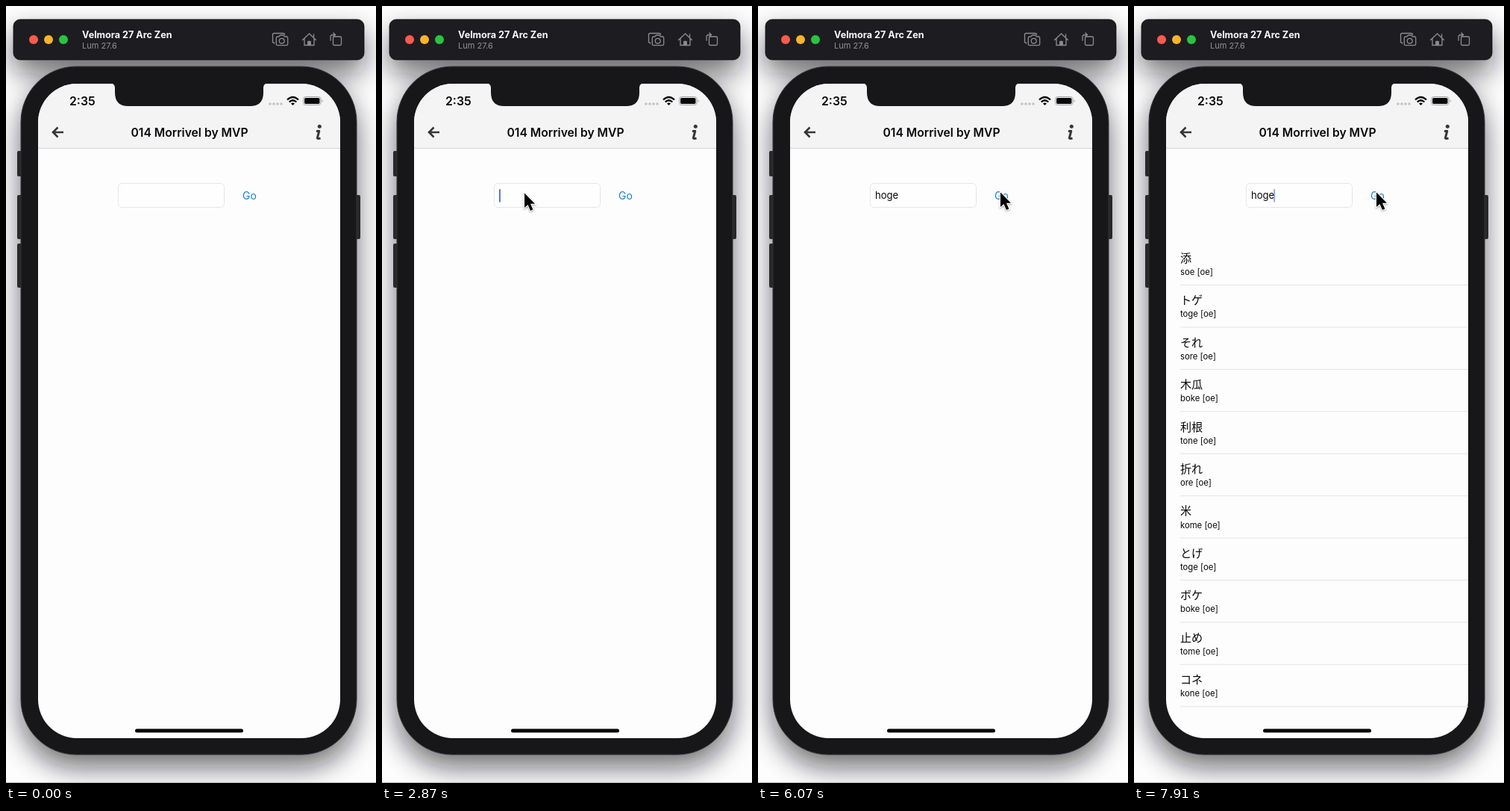
An HTML page that plays this animation: 496 by 1040 pixels, repeating every 8000 ms.

```html
<!DOCTYPE html>
<html lang="en">
<head>
<meta charset="utf-8">
<title>Word search</title>
<style>
html, body { margin: 0; width: 100%; height: 100%; overflow: hidden; background: #fdfdfd; }
svg { display: block; width: 496px; height: 1040px; }
text { font-family: Inter, "Noto Sans CJK JP", "Noto Sans CJK", sans-serif; fill: #08080a; }
.icon { fill: none; stroke: #8d8d90; stroke-width: 1.3; stroke-linejoin: round; stroke-linecap: round; }
</style>
</head>
<body>
<svg viewBox="0 0 496 1040">
  <defs>
    <filter id="shadow" x="-30%" y="-30%" width="160%" height="160%"><feGaussianBlur stdDeviation="18"/></filter>
    <filter id="soft" x="-50%" y="-50%" width="200%" height="200%"><feGaussianBlur stdDeviation="1.3"/></filter>
    <clipPath id="screenClip"><rect id="screen" x="43" y="104" width="405" height="876" rx="52"/></clipPath>
    <rect id="body" x="20" y="81" width="450" height="921" rx="74"/>
    <rect id="bar" x="10" y="18" width="470" height="54" rx="9"/>
    <path id="arrow" d="M0 0V19.5L4.500 15.400 8 23.500 11.400 22 8 14.300H14Z"/>
  </defs>

  <rect width="496" height="1040" fill="#fdfdfd"/>
  <g fill="#0c0c18" opacity=".6" filter="url(#shadow)">
    <use href="#body" y="17"/><use href="#bar" y="17"/>
  </g>
  <path d="M0 1039.5H496" stroke="#b9b9bb"/>

  <use href="#bar" fill="#1d1d21" stroke="#0c0c0e" stroke-width=".8"/>
  <circle cx="37" cy="45" r="6" fill="#fc5a50"/>
  <circle cx="57" cy="45" r="6" fill="#f7b42c"/>
  <circle cx="77" cy="45" r="6" fill="#2bc43e"/>
  <text x="102" y="43" font-size="12.6" font-weight="700" style="fill:#fafafa">Velmora 27 Arc Zen</text>
  <text x="102" y="57" font-size="11" style="fill:#929295">Lum 27.6</text>
  <g class="icon">
    <path d="M360 49.500H359.500Q357.500 49.500 357.500 47.500V38.500Q357.500 36.500 359.500 36.500H371.500Q373.500 36.500 373.500 38.500"/>
    <path d="M364 41H366L367.300 39H372L373.300 41H376Q377.700 41 377.700 42.700V51Q377.700 52.700 376 52.700H364Q362.300 52.700 362.300 51V42.700Q362.300 41 364 41Z"/>
    <circle cx="369.700" cy="46.800" r="3.400"/>
    <path d="M397.500 45.500 406.500 37 415.500 45.500M400 43.500V52.500H413V43.500M412.500 42V38"/>
    <path d="M404.800 52V47.500H408.200V52Z" fill="#8d8d90"/>
    <rect x="438.500" y="41" width="11" height="11.500" rx="1.500"/>
    <path d="M435 46V42Q435 38.500 438.500 38.500H441M439 36 441.500 38.500 439 41"/>
  </g>

  <g fill="#28282a">
    <rect x="15" y="194" width="8" height="34" rx="2"/>
    <rect x="15" y="253" width="8" height="59" rx="2"/>
    <rect x="15" y="318" width="8" height="59" rx="2"/>
    <rect x="467" y="253" width="8" height="59" rx="2"/>
  </g>
  <use href="#body" fill="#171719" stroke="#343437"/>
  <use href="#screen" fill="#fdfdfd"/>
  <g clip-path="url(#screenClip)">
    <rect x="43" y="104" width="405" height="86" fill="#f4f4f5"/>
    <path d="M43 190.500H448" stroke="#d3d3d6"/>
    <path d="M140 103Q146 104 146 110V116Q146 134 164 134H327Q345 134 345 116V110Q345 104 351 103Z" fill="#171719"/>
  </g>

  <text x="85" y="133" font-size="15.800" font-weight="600">2:35</text>
  <path d="M354 131H371" stroke="#c3c3c5" stroke-width="3.600" stroke-linecap="round" stroke-dasharray="0 5"/>
  <g fill="none" stroke="#08080a" stroke-width="2.300">
    <path d="M377 125.500Q384.500 118.500 392 125.500M379.700 128.500Q384.500 124 389.300 128.500"/>
    <path d="M382 130.500Q384.500 128.500 387 130.500L384.500 133Z" fill="#08080a" stroke="none"/>
  </g>
  <rect x="398.500" y="121.500" width="23.500" height="11" rx="3.300" fill="none" stroke="#a2a2a5"/>
  <rect x="400" y="123" width="20.500" height="8" rx="1.800" fill="#08080a"/>
  <path d="M423.500 125V129Q426 127 423.500 125Z" fill="#a2a2a5"/>

  <path d="M77 169H63.500M69.500 162.500 63 169 69.500 175.500" fill="none" stroke="#363638" stroke-width="2.600"/>
  <text x="246" y="175" font-size="15.700" font-weight="600" text-anchor="middle">014 Morrivel by MVP</text>
  <circle cx="420.300" cy="161.300" r="2.500" fill="#363638"/>
  <path d="M416 167.500H419.800L417.500 176Q417 178.500 421.500 176.800" fill="none" stroke="#363638" stroke-width="2.900" stroke-linejoin="round"/>

  <rect x="150.500" y="237.500" width="142" height="32" rx="5" fill="#fefefe" stroke="#e6e6e8"/>
  <text id="entry" x="157" y="258" font-size="13.100"></text>
  <rect id="caret" y="245" width="1.800" height="17.500" rx=".6" fill="#4a68d2"/>
  <text x="317" y="259" font-size="14" style="fill:#1580d4">Go</text>
  <g id="results"></g>
  <rect x="173" y="967.500" width="145" height="5" rx="2.500" fill="#08080a"/>

  <g id="pointer">
    <use href="#arrow" x="1" y="2.500" stroke="#000" stroke-width="2" opacity=".4" filter="url(#soft)"/>
    <use href="#arrow" x="1" y="1.500" stroke="#fefefe" stroke-width="2.200" paint-order="stroke"/>
  </g>
</svg>
<script>
const LOOP = 8000, RESULTS_AT = 7350;
const byId = id => document.getElementById(id);
const [entry, caret, results, pointer] = ["entry", "caret", "results", "pointer"].map(byId);

const words = [
  ["添", "soe"], ["トゲ", "toge"], ["それ", "sore"], ["木瓜", "boke"], ["利根", "tone"], ["折れ", "ore"],
  ["米", "kome"], ["とげ", "toge"], ["ボケ", "boke"], ["止め", "tome"], ["コネ", "kone"]
];
results.innerHTML = words.map(([word, reading], i) => `
  <g transform="translate(62 ${317 + i * 56.43})">
    <text y="25.800" font-size="15.100">${word}</text>
    <text y="43" font-size="11.300">${reading} [oe]</text>
    <path d="M0 56.500H386" stroke="#e3e3e5"/>
  </g>`).join("");

// Pointer stops: time, x, y of the tip
const stops = [
  [750, 300, 420], [1200, 190, 255], [1500, 190, 255], [1750, 190, 249],
  [4750, 190, 249], [5350, 325, 251], [5650, 325, 251], [5850, 324, 248]
];
const keyTimes = [3750, 4050, 4350, 4600];
const clamp = v => Math.max(0, Math.min(1, v));
const ease = v => v * v * (3 - 2 * v);

function pointerAt(t) {
  const next = stops.findIndex(stop => stop[0] > t);
  if (next < 0) return stops[stops.length - 1].slice(1);
  const [t0, x0, y0] = stops[Math.max(0, next - 1)];
  const [t1, x1, y1] = stops[next];
  const k = ease(clamp((t - t0) / (t1 - t0 || 1)));
  return [x0 + (x1 - x0) * k, y0 + (y1 - y0) * k];
}

function caretOpacity(t) {
  if (t < 1950) return 0;
  if (t < 2400 || (t > keyTimes[0] && t < 4950)) return 1;
  const phase = t % 1000;
  return clamp((phase - 500) / 80) * clamp((960 - phase) / 80);
}

function draw(t) {
  const typed = "hoge".slice(0, keyTimes.filter(k => t >= k).length);
  if (entry.textContent !== typed) entry.textContent = typed;
  caret.setAttribute("x", 157 + (typed ? entry.getComputedTextLength() - 1 : 0));
  caret.setAttribute("opacity", caretOpacity(t));
  results.setAttribute("visibility", t >= RESULTS_AT ? "visible" : "hidden");
  pointer.setAttribute("visibility", t >= stops[0][0] ? "visible" : "hidden");
  pointer.setAttribute("transform", `translate(${pointerAt(t)})`);
}

const start = performance.now();
function tick() {
  draw((performance.now() - start) % LOOP);
  requestAnimationFrame(tick);
}
tick();
</script>
</body>
</html>
```
